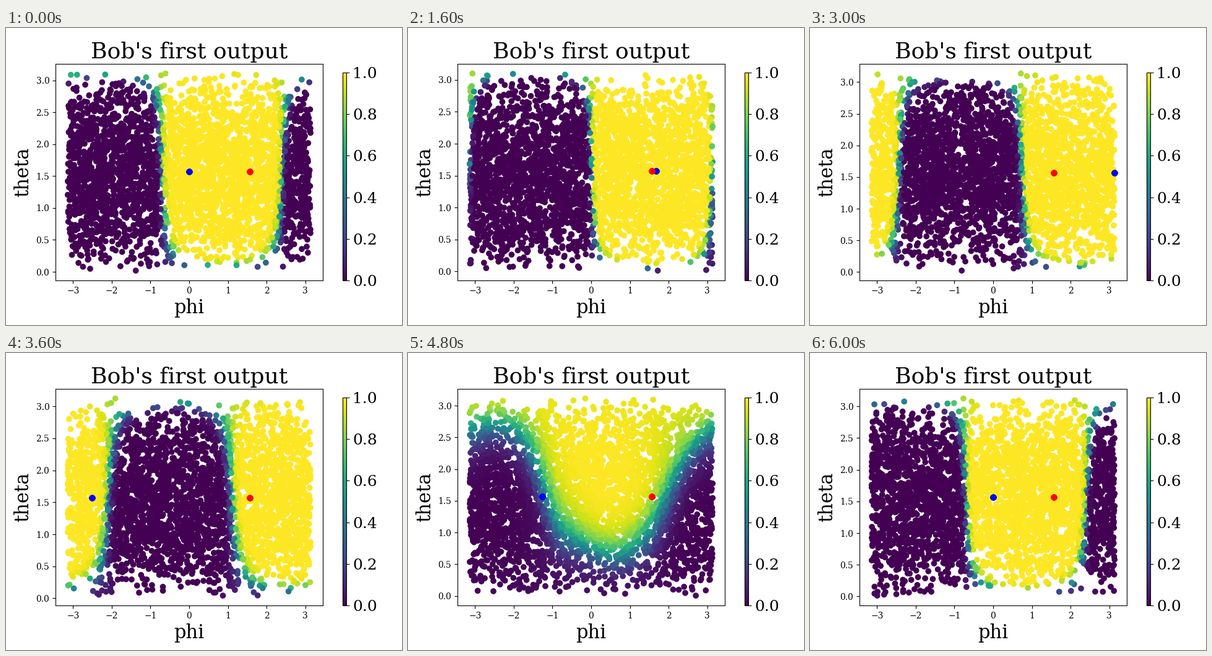
A matplotlib script for the animation above (6200 ms loop, 640 by 480 pixels).

```python
import numpy as np
import matplotlib.pyplot as plt
from matplotlib.animation import FuncAnimation
from matplotlib.cm import ScalarMappable
from matplotlib.colors import Normalize

plt.rcParams["font.family"] = "DejaVu Serif"

FRAMES = 31
POINTS = 3600
PI = np.pi
FLIP = 22.5  # step at which blue stands opposite red


def wrap(angle):
    return np.arctan2(np.sin(angle), np.cos(angle))


def blue_angle(step):
    return 2 * PI * step / (FRAMES - 1)


def bump(x, center, width):
    return np.exp(-((x - center) / width) ** 2)


def wavy(phi, theta):
    """Soft wavy border between dark (below) and bright (above)."""
    left = bump(phi, -2.2, .5)
    notch = bump(phi, -.1, .3)
    border = 1.7 + .8 * np.cos(phi + .9) - .35 * left - .2 * notch
    width = .38 + .15 * left + .25 * notch
    return np.clip(2.2 * (theta - border) / width, -4.5, 4.5)


def output(phi, theta, step):
    """Chance of the first output for a point on the sphere."""
    blue = blue_angle(step)
    half = (blue - PI / 2) / 2
    center = blue - half + .08 * np.cos(blue + .6)
    along = 2 * np.cos(half) * np.sin(theta) * np.cos(phi - center)
    logit = 24 * (along - .1 * np.cos(theta) - .02)

    # near the flip the two directions cancel and the wavy border takes over
    mix = np.clip((2.5 - abs(step - FLIP)) / 2, 0, 1)
    side = phi if step < FLIP else wrap(PI - phi)
    logit = (1 - mix) * logit + mix * wavy(side, theta)
    return 1 / (1 + np.exp(-logit))


def sample(step):
    rng = np.random.default_rng(100 + step)
    phi = rng.uniform(-PI, PI, POINTS)
    theta = np.arccos(rng.uniform(-1, 1, POINTS))
    return phi, theta


fig, ax = plt.subplots(figsize=(6.4, 4.8), dpi=100)
fig.subplots_adjust(left=.125, right=.8, bottom=.15, top=.88)
ax.set_title("Bob's first output", fontsize=26)
ax.set_xlabel("phi", fontsize=22)
ax.set_ylabel("theta", fontsize=22)
ax.set_xlim(-1.1 * PI, 1.1 * PI)

cax = fig.add_axes([.85, .15, .01, .7])
bar = fig.colorbar(ScalarMappable(Normalize(0, 1), "viridis"), cax=cax)
bar.ax.tick_params(labelsize=18)

cloud = ax.scatter(np.zeros(POINTS), np.zeros(POINTS), c=np.zeros(POINTS),
                   cmap="viridis", vmin=0, vmax=1)


def marker(color):
    # stacked copies give the hard edge
    return ax.scatter([PI / 2] * 30, [PI / 2] * 30, color=color)


blue_dot = marker("blue")
red_dot = marker("red")


def draw(step):
    phi, theta = sample(step)
    cloud.set_offsets(np.column_stack([phi, theta]))
    cloud.set_array(output(phi, theta, step))

    blue_dot.set_offsets([(wrap(blue_angle(step)), PI / 2)] * 30)
    red_dot.set_color("#7a0a50" if abs(step - FLIP) < 1 else "red")

    pad = .05 * np.ptp(theta)
    ax.set_ylim(theta.min() - pad, theta.max() + pad)
    return cloud, blue_dot, red_dot


anim = FuncAnimation(fig, draw, frames=FRAMES, interval=200, repeat=True,
                     repeat_delay=0, blit=False)
plt.show()
```
